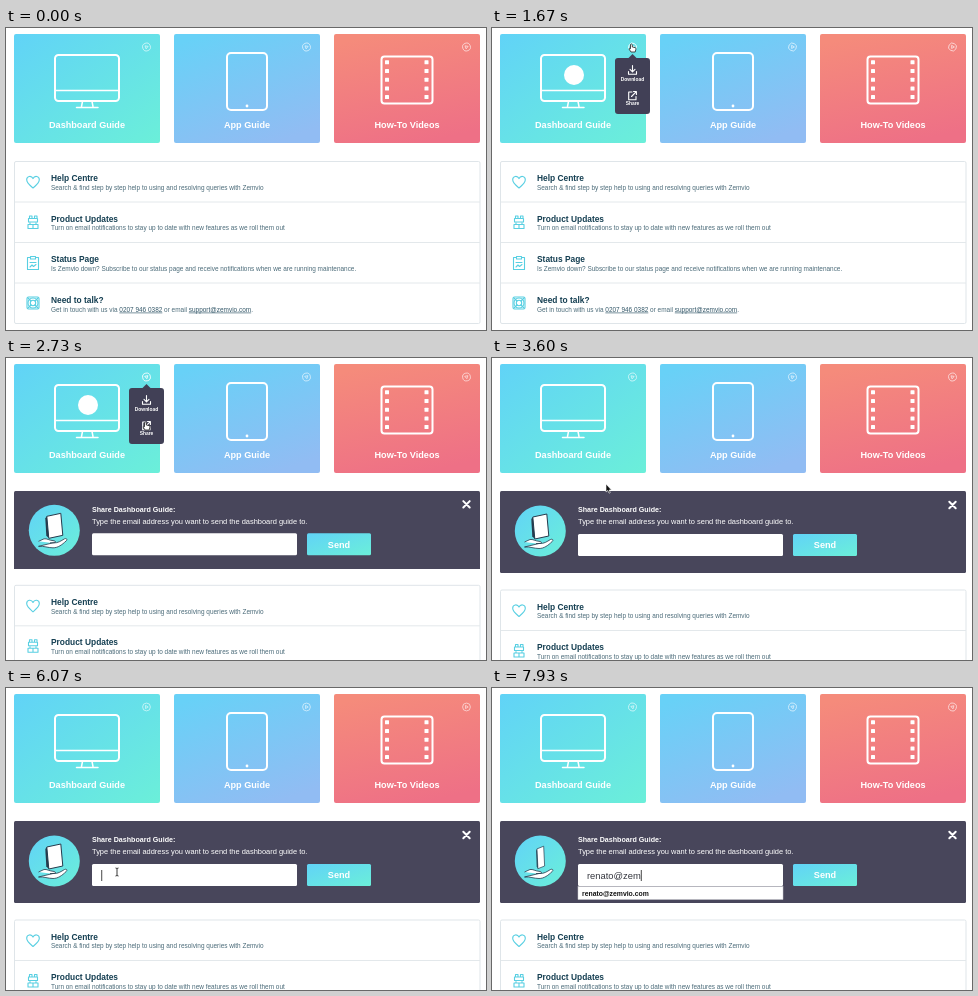
Recreate the animation shown at these times as an HTML page. Size 480 px wide and 302 px high, loop 8000 ms.

```html
<!DOCTYPE html>
<html lang="en">
<head>
<meta charset="utf-8">
<title>Share a guide</title>
<style>
html, body { margin: 0; width: 100%; height: 100%; overflow: hidden; background: #fff; }
svg { display: block; width: 100%; height: 100%; font-family: "Liberation Sans", Arial, sans-serif; }
.card text, .send { font-weight: 700; font-size: 9.15px; fill: #fff; text-anchor: middle; }
.line { fill: none; stroke: #fff; stroke-width: 2; stroke-linejoin: round; stroke-linecap: round; }
.icon { fill: none; stroke: #58cfe2; stroke-width: 1.1; stroke-linejoin: round; stroke-linecap: round; }
.title { font-weight: 700; font-size: 8.4px; fill: #153f52; }
.sub { font-size: 6.44px; fill: #4b6b79; }
.link { text-decoration: underline; fill: #35596a; }
.menu text { font-weight: 700; font-size: 4.9px; fill: #fff; text-anchor: middle; }
</style>
</head>
<body>
<svg viewBox="0 0 480 302" preserveAspectRatio="none">
  <defs>
    <linearGradient id="aqua" x1="0" y1="0" x2="1" y2="1">
      <stop offset="0" stop-color="#61d3f7"/><stop offset="1" stop-color="#6befd9"/>
    </linearGradient>
    <linearGradient id="sky" x1=".2" y1="0" x2=".7" y2="1">
      <stop offset="0" stop-color="#68d1f7"/><stop offset="1" stop-color="#91bcf3"/>
    </linearGradient>
    <linearGradient id="coral" x1=".3" y1="0" x2=".6" y2="1">
      <stop offset="0" stop-color="#f58b7b"/><stop offset="1" stop-color="#ee7086"/>
    </linearGradient>
    <clipPath id="panelClip"><rect id="panelClipBox" x="8" y="133" width="466" height="82"/></clipPath>
  </defs>
  <rect width="480" height="302" fill="#fff"/>

  <g class="card">
    <rect x="8" y="6" width="146" height="109" rx="2" fill="url(#aqua)"/>
    <rect x="168" y="6" width="146" height="109" rx="2" fill="url(#sky)"/>
    <rect x="328" y="6" width="146" height="109" rx="2" fill="url(#coral)"/>
    <g class="line">
      <rect x="49" y="27" width="64" height="46" rx="3.5"/>
      <path d="M49 62.5H113" stroke-width="1.4"/>
      <path d="M76.500 73.500L75.500 78.500M86 73.500L87 78.500M70.500 79.500H92" stroke-width="1.5"/>
      <rect x="221" y="25" width="40" height="57" rx="4"/>
      <rect x="375.500" y="28.500" width="51" height="47" rx="3"/>
    </g>
    <circle cx="241" cy="78" r="1.4" fill="#fff"/>
    <g id="holes" fill="#fff"></g>
    <circle id="badge" cx="82" cy="47" r="10" fill="#fff"/>
    <text x="81" y="100.300">Dashboard Guide</text>
    <text x="241" y="100.300">App Guide</text>
    <text x="401" y="100.300">How-To Videos</text>
    <g id="spinners"></g>
  </g>

  <g id="list">
    <rect x="8.500" y="133.500" width="465.500" height="162" rx="1.500" fill="#fff" stroke="#dfe5e9"/>
    <path d="M9 174H474M9 214.500H474M9 255H474" stroke="#e3e8eb"/>
    <g class="icon">
      <path d="M27 160C24 157.500 20.700 155 20.700 151.800C20.700 147.800 25.500 147.300 27 150.600C28.500 147.300 33.300 147.800 33.300 151.800C33.300 155 30 157.500 27 160Z"/>
      <path d="M22.500 190.500H31.500V194H22.500ZM22 196.500H32V200.500H22ZM23.500 190V188H26V190M28.500 190V188H31V190M24 196V195M30 196V195M27 197V200"/>
      <path d="M24.500 229.500H21.500V241.500H32.500V229.500H29.500M24.500 228.500H29.500V231H24.500ZM24 234.500H30M24 239L26 237L27.500 238.500L30 236.500"/>
      <rect x="21" y="269" width="12" height="12" rx="1.500"/>
      <circle cx="27" cy="275" r="2.700"/><circle cx="27" cy="275" r="5"/>
      <path d="M22 270L25 273M32 270L29 273M22 280L25 277M32 280L29 277"/>
    </g>
    <g class="title">
      <text x="45" y="153">Help Centre</text>
      <text x="45" y="193.600">Product Updates</text>
      <text x="45" y="234.200">Status Page</text>
      <text x="45" y="274.800">Need to talk?</text>
    </g>
    <g class="sub">
      <text x="45" y="161.800">Search &amp; find step by step help to using and resolving queries with Zemvio</text>
      <text x="45" y="202.400">Turn on email notifications to stay up to date with new features as we roll them out</text>
      <text x="45" y="243">Is Zemvio down? Subscribe to our status page and receive notifications when we are running maintenance.</text>
      <text x="45" y="283.600">Get in touch with us via <tspan class="link">0207 946 0382</tspan> or email <tspan class="link">support@zemvio.com</tspan>.</text>
    </g>
  </g>

  <g id="panel" clip-path="url(#panelClip)">
    <rect x="8" y="133" width="466" height="82" rx="1.500" fill="#48465b"/>
    <g id="panelBody">
      <circle cx="48.300" cy="173" r="25.500" fill="url(#aqua)"/>
      <g id="book">
        <path d="M-8 -9L6 -12L8 10L-6 13Z" fill="#fff" stroke="#263a4c" stroke-width="1"/>
        <path d="M-8 -9L-6 13L-8.500 10.500L-9.500 -7Z" fill="#263a4c"/>
      </g>
      <path d="M32.500 184L38 181.500C41 181 43 183 47 183.300C50 183.500 50.500 185.500 47 185.500H44M47 185.500C52 186 55 183.500 58.500 181.500C61 180.500 61.500 182.500 60 183.700C56 187.500 52 190.500 47 190.500C42 190.500 38 188.500 32.500 189Z" fill="#fff" stroke="#263a4c" stroke-width=".8" stroke-linejoin="round"/>
      <text x="86" y="154.400" font-size="7.12" font-weight="700" fill="#fff">Share Dashboard Guide:</text>
      <text x="86" y="166.300" font-size="7.440" fill="#fff">Type the email address you want to send the dashboard guide to.</text>
      <rect x="86" y="176" width="205" height="22" rx="1.500" fill="#fff"/>
      <rect x="301" y="176" width="64" height="22" rx="1.500" fill="url(#aqua)"/>
      <text class="send" x="333" y="190.400" font-size="9.400">Send</text>
      <path class="line" d="M457.300 143.800L463.700 150.200M463.700 143.800L457.300 150.200" stroke-width="1.600"/>
    </g>
  </g>
  <text id="typed" x="95" y="190.700" font-size="9.400" fill="#33353d"></text>
  <rect id="caret" y="182" width=".9" height="11" fill="#333"/>
  <g id="suggestion">
    <rect x="86" y="198.500" width="205" height="13" fill="#fff" stroke="#c9c9d0" stroke-width=".5"/>
    <text x="90" y="207.600" font-size="6.850" font-weight="700" fill="#111">renato@zemvio.com</text>
  </g>

  <g id="menu" class="menu">
    <path d="M126 30H136.500L140.500 26L144.500 30H155Q158 30 158 33V83Q158 86 155 86H126Q123 86 123 83V33Q123 30 126 30Z" fill="#414056"/>
    <g class="line" style="stroke-width:1.100">
      <path d="M140.500 37.500V43.500M138 41.300L140.500 43.800L143 41.300M136.500 43.500V46.200H144.500V43.500"/>
      <path d="M140 64H136.700V71.700H144V68.500M139.500 68.500L144 63.800M141.500 63.500H144.400V66.500"/>
    </g>
    <text x="140.500" y="53">Download</text>
    <text x="140.500" y="77.300">Share</text>
  </g>

  <g id="cursor">
    <path id="arrow" d="M0 -4V4L1.800 2.500L3 5.200L4.300 4.600L3.100 2H5.500Z" fill="#111" stroke="#fff" stroke-width=".6"/>
    <path id="hand" d="M-1.500 -3.500Q-.5 -4.500 .3 -3.300V-1L3.500 -.3Q4 0 3.800 1.500L3.200 4H-1L-3 1Q-3 -.2 -1.500 .7Z" fill="#fff" stroke="#222" stroke-width=".8" stroke-linejoin="round"/>
    <path id="beam" d="M-1.500 -4Q0 -4 0 -3V3Q0 4 -1.500 4M1.500 -4Q0 -4 0 -3M0 3Q0 4 1.500 4" fill="none" stroke="#222" stroke-width=".9"/>
  </g>
</svg>
<script>
const LOOP = 8000;
const ADDRESS = "renato@zem";
const KEY_TIMES = [6300, 6420, 6550, 6690, 6880, 7010, 7290, 7420, 7690, 7830];
// Pointer stops: time, x, y
const POINTER = [
  [80, 124, 312], [850, 114, 65], [1050, 114, 65], [1500, 140, 20], [1780, 140, 20],
  [2250, 140, 68], [2900, 140, 68], [3540, 114, 130], [3660, 114, 130], [4350, 111, 184]
];

const el = id => document.getElementById(id);
const set = (node, attrs) => { for (const k in attrs) node.setAttribute(k, attrs[k]); };
const show = (id, on) => set(el(id), { visibility: on ? "visible" : "hidden" });
const progress = (t, from, to) => Math.min(1, Math.max(0, (t - from) / (to - from)));
const swing = p => 0.5 - Math.cos(Math.PI * p) / 2;

function add(parent, tag, attrs) {
  const node = document.createElementNS("http://www.w3.org/2000/svg", tag);
  set(node, attrs);
  parent.append(node);
  return node;
}

for (const x of [379, 418.5])
  for (let i = 0; i < 5; i++)
    add(el("holes"), "rect", { x, y: 32.3 + i * 8.7, width: 4, height: 4, rx: 0.5 });

const spinners = [140.5, 300.5, 460.5].map(x => {
  const group = add(el("spinners"), "g", { fill: "none", stroke: "#fff", "stroke-width": 0.8 });
  add(group, "circle", { r: 3.9 });
  add(group, "path", { d: "M-1 -1.6L1.7 0L-1 1.6Z" });
  return { group, x };
});

function pointerAt(t) {
  let i = 0;
  while (i < POINTER.length - 1 && t >= POINTER[i + 1][0]) i++;
  const a = POINTER[i], b = POINTER[i + 1] || a;
  const p = a === b ? 0 : swing(progress(t, a[0], b[0]));
  return [a[1] + (b[1] - a[1]) * p, a[2] + (b[2] - a[2]) * p];
}

function drawPointer(t) {
  const [x, y] = pointerAt(t);
  const visible = t > 80 && t < KEY_TIMES[0];
  const kind = y < 115 ? "hand" : y > 176 && t > 3660 ? "beam" : "arrow";
  set(el("cursor"), { transform: `translate(${x} ${y})` });
  for (const id of ["arrow", "hand", "beam"]) show(id, visible && id === kind);
}

function drawCards(t) {
  const hover = progress(t, 640, 840) * (1 - progress(t, 3300, 3480));
  set(el("badge"), { opacity: hover, cy: 47 + 6 * (1 - hover) });
  const menu = progress(t, 1500, 1640) * (1 - progress(t, 3360, 3540));
  set(el("menu"), { opacity: menu });
  const angle = (t - 2470) / 1200 * 360;
  spinners.forEach(({ group, x }, i) => set(group, {
    transform: `translate(${x} 19) rotate(${angle})`,
    opacity: i ? 0.7 : 0.7 + 0.3 * menu
  }));
}

function drawPanel(t) {
  const open = swing(progress(t, 2436, 2779));
  set(el("panelClipBox"), { height: 82 * open });
  set(el("panelBody"), { transform: `translate(0 ${-14 * (1 - open)})` });
  set(el("list"), { transform: `translate(0 ${98.5 * open})` });
  show("panel", open > 0);
  const turn = swing(progress(t, 7620, 7930));
  set(el("book"), {
    transform: `translate(48.8 ${168 + turn}) scale(${1 - 0.52 * turn} ${1 - 0.1 * turn})`
  });
}

function drawField(t) {
  const count = KEY_TIMES.filter(k => t >= k).length;
  const typed = el("typed");
  typed.textContent = ADDRESS.slice(0, count);
  set(el("caret"), { x: 95 + (count ? typed.getComputedTextLength() : 0.3) });
  const blink = Math.floor((t - 4900) / 500) % 2 === 0;
  show("caret", t >= 4900 && (count > 0 || blink));
  show("suggestion", t >= 6360);
}

function draw(t) {
  drawCards(t);
  drawPanel(t);
  drawField(t);
  drawPointer(t);
}

const start = performance.now();
function tick() {
  draw((performance.now() - start) % LOOP);
  requestAnimationFrame(tick);
}
tick();
</script>
</body>
</html>
```
